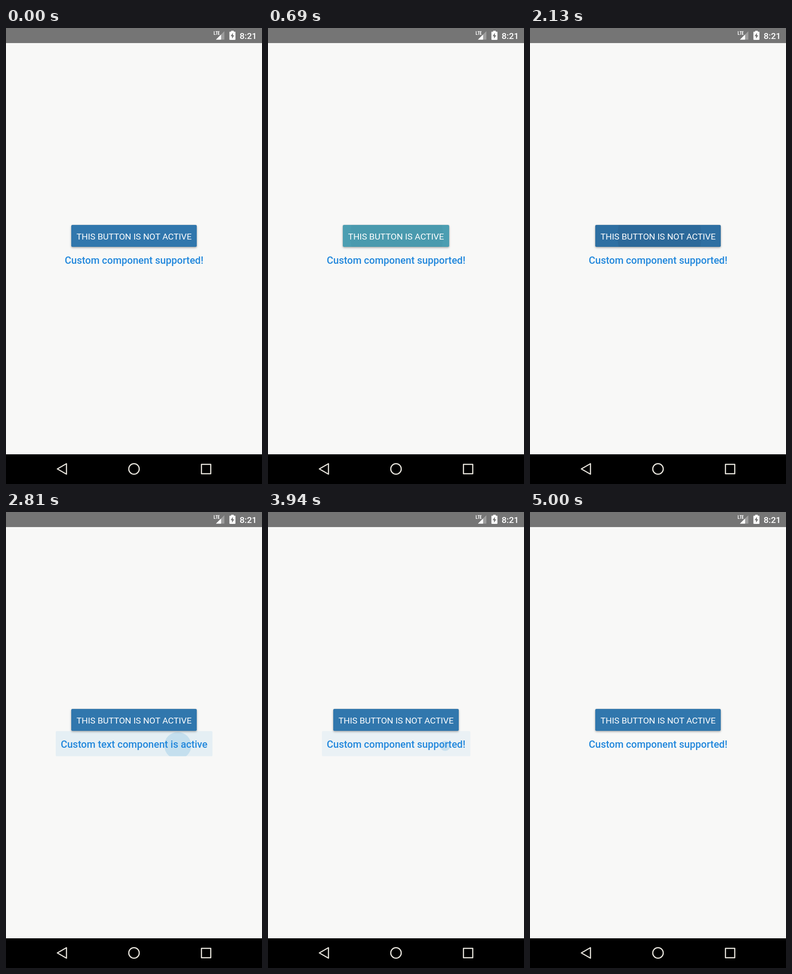
Recreate the animation shown at these times as an HTML page. Size 561 px wide and 998 px high, loop 5.06 s.

```html
<!DOCTYPE html>
<html lang="en">
<head>
<meta charset="utf-8">
<title>Button states</title>
<style>
  html, body { margin: 0; width: 100%; height: 100%; overflow: hidden; background: #f8f8f7; }
  svg { display: block; width: 100vw; height: 100vh; }
  text { font-family: Roboto, sans-serif; }
  .label { font-size: 19.1px; fill: #fff; text-anchor: middle; }
  .custom { font-size: 21.85px; font-weight: 500; fill: #2187dc; text-anchor: middle; }
  .clock { font-size: 19.1px; font-weight: 500; fill: #fff; }
  .nav { fill: none; stroke: #e8e5dd; stroke-width: 2.5; stroke-linejoin: round; }
  .shadow { filter: drop-shadow(0 2.6px 2.2px rgba(0, 0, 0, .27)) drop-shadow(0 0.5px 1.2px rgba(0, 0, 0, .14)); }
</style>
</head>
<body>
<svg viewBox="0 0 561 998">
  <defs>
    <clipPath id="customClip"><rect id="customClipBox" rx="2.7"/></clipPath>
    <clipPath id="buttonClip"><rect id="buttonClipBox" rx="2.7"/></clipPath>
  </defs>
  <rect width="561" height="998" fill="#f8f8f7"/>

  <g clip-path="url(#customClip)" fill="#218ccd">
    <rect id="customGlow" y="479" width="561" height="56"/>
    <circle id="customRipple"/>
  </g>
  <rect id="button" class="shadow" rx="2.7"/>
  <g clip-path="url(#buttonClip)">
    <rect id="buttonGlow" y="430" width="561" height="50"/>
    <circle id="buttonRipple"/>
  </g>
  <text id="buttonText" class="label" x="280.6" y="463"></text>
  <text id="customText" class="custom" x="280.7" y="516"></text>

  <rect width="561" height="33" fill="#757575"/>
  <path d="M456.2 7v7.4h3M459.4 7.6h4.4M461.6 7v8M468 7.6h-2.8v6.8h2.8M465.2 11h2.4" fill="none" stroke="#fff" stroke-width="1.4"/>
  <path d="M460 25.5L478.5 7V25.5Z" fill="#fff" opacity=".3"/>
  <path d="M460 25.5L471.3 14.2V25.5Z" fill="#fff"/>
  <path d="M493.5 8V6h5.5v2h2.5q1.3 0 1.3 1.3v15.4q0 1.3 -1.3 1.3h-10.6q-1.3 0 -1.3 -1.3V9.3q0 -1.3 1.3 -1.3Z" fill="#fff"/>
  <path d="M497.2 10.5L492.3 18h3v5.6L500.2 16h-3Z" fill="#757575"/>
  <text class="clock" x="512" y="24">8:21</text>

  <rect y="933" width="561" height="65" fill="#000"/>
  <path class="nav" d="M112.5 965L132.5 953.5V976.5Z"/>
  <circle class="nav" cx="280.5" cy="965" r="11.5"/>
  <rect class="nav" x="428.3" y="955" width="20.4" height="20.4"/>
</svg>
<script>
const LOOP = 5060;

const BUTTON = {
  off: { label: 'THIS BUTTON IS NOT ACTIVE', fill: '#3177ad', x: 143, y: 431, w: 275, h: 48 },
  on: { label: 'THIS BUTTON IS ACTIVE', fill: '#51a9bf', x: 164, y: 431, w: 233, h: 48 }
};
const CUSTOM = {
  off: { label: 'Custom component supported!', x: 118.2, y: 479.6, w: 325.2, h: 55 },
  on: { label: 'Custom text component is active', x: 109, y: 479.6, w: 343.4, h: 55 }
};

// Each tap: press time, state switch, start and end of the highlight fade.
const BUTTON_TAPS = [
  { start: 290, toggle: 350, release: 690, end: 1000, x: 290, y: 456 },
  { start: 1800, toggle: 1870, release: 2160, end: 2530, x: 290, y: 456 }
];
const CUSTOM_TAPS = [
  { start: 2690, toggle: 2750, release: 2930, end: 3280, x: 396, y: 512 },
  { start: 3880, toggle: 3940, release: 4330, end: 4770, x: 396, y: 512 }
];

const el = id => document.getElementById(id);
const set = (node, attrs) => {
  for (const key in attrs) node.setAttribute(key, attrs[key]);
};
const clamp = v => Math.max(0, Math.min(1, v));
const ramp = (t, from, to) => clamp((t - from) / (to - from));
const lerp = (a, b, p) => a + (b - a) * p;

function place(id, box) {
  set(el(id), { x: box.x, y: box.y, width: box.w, height: box.h });
}

function drawRipple(name, box, taps, t, glowAlpha, rippleAlpha) {
  const tap = taps.find(k => t >= k.start && t < k.end);
  let glow = 0, alpha = 0;
  if (tap) {
    const age = t - tap.start;
    const grow = Math.pow(clamp(age / 450), 1.35);
    glow = glowAlpha * lerp(0.35, 1, ramp(age, 0, 180)) * (1 - ramp(t, tap.release, tap.end));
    alpha = rippleAlpha * (1 - ramp(age, 200, 460));
    set(el(name + 'Ripple'), {
      cx: lerp(tap.x, box.x + box.w / 2, grow),
      cy: lerp(tap.y, box.y + box.h / 2, grow),
      r: grow * Math.hypot(box.w, box.h) / 2
    });
  }
  set(el(name + 'Glow'), { 'fill-opacity': glow });
  set(el(name + 'Ripple'), { 'fill-opacity': alpha });
}

function drawControl(name, states, taps, t, glowAlpha, rippleAlpha) {
  const on = t >= taps[0].toggle && t < taps[1].toggle;
  const state = on ? states.on : states.off;
  el(name + 'Text').textContent = state.label;
  place(name + 'ClipBox', state);
  drawRipple(name, state, taps, t, glowAlpha, rippleAlpha);
  return state;
}

function draw(t) {
  drawControl('custom', CUSTOM, CUSTOM_TAPS, t, 0.115, 0.17);
  const state = drawControl('button', BUTTON, BUTTON_TAPS, t, 0.065, 0.1);
  place('button', state);
  set(el('button'), { fill: state.fill });
}

const origin = performance.now();
function tick() {
  draw((performance.now() - origin) % LOOP);
  requestAnimationFrame(tick);
}
tick();
</script>
</body>
</html>
```
